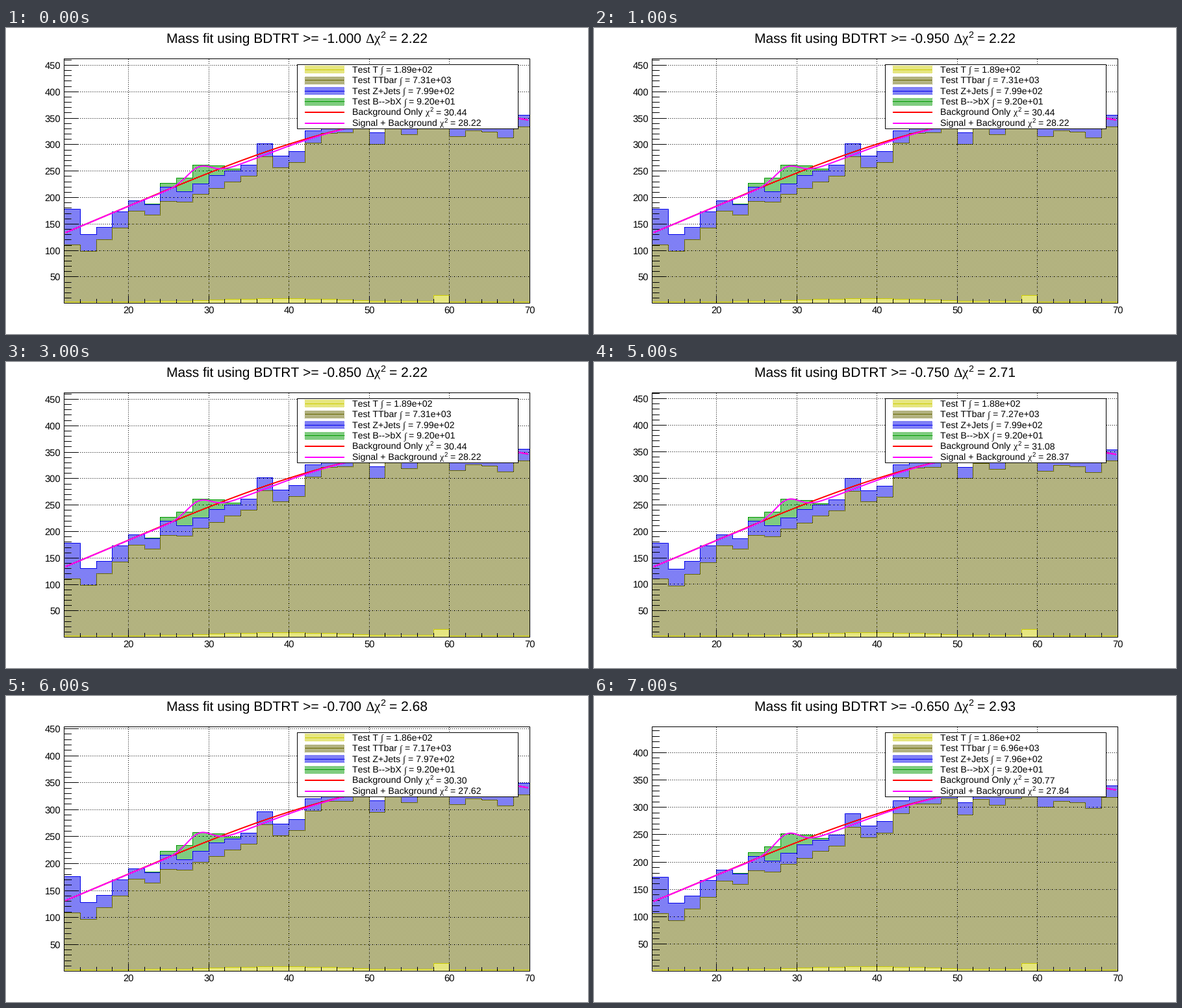
Animation, 896 px wide and 472 px high, one loop 8000 ms. Source, as a matplotlib script:

```python
import numpy as np
import matplotlib.pyplot as plt
from matplotlib.animation import FuncAnimation
from matplotlib.patches import Rectangle

W, H, DPI = 896, 472, 64
PX = 72 / DPI                      # points per pixel
LEFT, RIGHT, TOP, BASE = 89.6, 806.4, 47.2, 424.8
XMIN, XMAX, NBINS = 12, 70, 29
SANS, SERIF = "Liberation Sans", "Liberation Serif"
RED, MAGENTA = "#ff0000", "#ff00ff"

plt.rcParams.update({"text.kerning_factor": 6, "text.hinting": "none",
                     "path.snap": False})

# Yields and fit quality for each distinct selection; the heights follow them
SAMPLES = [  # name, x of the integral sign, colour, yields
    ("Test T", 576.9, (204, 204, 0), (189, 188, 186, 186)),
    ("Test TTbar", 605.9, (102, 102, 0), (7310, 7270, 7170, 6960)),
    ("Test Z+Jets", 611, (0, 0, 235), (799, 799, 797, 796)),
    ("Test B-->bX", 612.5, (0, 153, 0), (92, 92, 92, 92)),
]
FITS = [  # name, x of the chi, colour, chi squared
    ("Background Only", 645.1, RED, (30.44, 31.08, 30.30, 30.77)),
    ("Signal + Background", 667.4, MAGENTA, (28.22, 28.37, 27.62, 27.84)),
]
Y_MAX = (462.6, 461.4, 454, 447.8)
YIELDS = np.array([s[3] for s in SAMPLES])

# Bin contents for the loosest selection
b = np.arange(NBINS)
centre = XMIN + 2 * b + 1
t_bins = 3 + 6 * np.exp(-((b - 13) / 5) ** 2) + 12 * np.exp(-4 * (b - 23) ** 2)
tt_tops = np.array([111, 98, 120, 142, 174, 167, 193, 191, 206, 217, 230, 240,
                    277, 257, 266, 303, 321, 322, 331, 301, 330, 319, 331, 335,
                    315, 326, 324, 313, 334])
z_bins = (22 + 10 * np.exp(-b / 8) * np.cos(2 * np.pi * b / 3)
          + 35 * np.exp(-b / 1.1))
signal_bins = 36 * np.exp(-((centre - 28.6) / 2) ** 2 / 2)
BINS = np.array([t_bins, tt_tops - t_bins, z_bins, signal_bins])

# Fit curves
fx = np.linspace(12.15, 69.8, 240)
background = np.polyval(np.polyfit([12, 20, 30, 40, 47.2, 70],
                                   [133, 183, 247, 301, 331, 346], 3), fx)
dip = 6 * np.exp(-((fx - 34) / 8) ** 2)
bump = np.exp(-((fx - 28.8) / 1.5) ** 2 / 2)

rows, cols = np.mgrid[:H, :W]
checker = (cols + rows) % 2 == 0
edges = np.linspace(LEFT, RIGHT, NBINS + 1)
col_bin = np.clip(np.searchsorted(edges, np.arange(W) + .5) - 1, 0, NBINS - 1)
in_frame = (cols >= 90) & (cols < 806) & (rows < 425)

fig = plt.figure(figsize=(W / DPI, H / DPI), dpi=DPI, facecolor="white")
ax = fig.add_axes([0, 0, 1, 1])


def x_px(v):
    return LEFT + (v - XMIN) * (RIGHT - LEFT) / (XMAX - XMIN)


def snap(v):
    return np.floor(v) + .5


def unit(rgb):
    return tuple(c / 255 for c in rgb)


def text(x, y, s, size, font=SANS, ha="left"):
    ax.text(x, y, s, fontsize=size * PX, family=font, ha=ha, va="baseline",
            zorder=7)


def line(x, y, color="black", width=1, **kw):
    ax.plot(x, y, color=color, lw=width * PX, solid_capstyle="butt",
            dash_capstyle="butt", **kw)


def chi_squared(x, y, size):
    text(x, y, "χ", size, SERIF)
    text(x + .53 * size, y - .38 * size, "2", .68 * size)


def image(img, x, y, zorder):
    h, w = img.shape[:2]
    ax.imshow(img, extent=(x, x + w, y + h, y), interpolation="nearest",
              aspect="auto", zorder=zorder)


def draw_stack(stage, scale):
    growth = YIELDS[:, stage] / YIELDS[:, 0]
    tops = np.cumsum(BINS * growth[:, None], axis=0)
    img = np.full((H, W, 3), 255, np.uint8)
    for top, sample in reversed(list(zip(tops, SAMPLES))):
        y = BASE - scale * top
        inside = in_frame & (rows + .5 >= y[col_bin])
        img[inside] = 255
        img[inside & checker] = sample[2]
        line(snap(np.repeat(edges, 2)[1:-1]), snap(np.repeat(y, 2)),
             unit(sample[2]))
    image(img, 0, 0, 0)


def draw_axes(scale):
    dotted = dict(linestyle=(0, (1, 2)))
    for v in range(0, int((BASE - TOP) / scale) + 1, 10):
        y, major = snap(BASE - scale * v), v % 50 == 0
        line([90, 111 if major else 101], [y, y])
        if major and v:
            line([90, 806], [y, y], **dotted)
            text(84.2, y + 5, str(v), 14.8, ha="right")
    for v in range(XMIN, XMAX + 1, 2):
        x, major = snap(x_px(v)), v % 10 == 0
        line([x, x], [424, 413 if major else 418])
        if major:
            line([x, x], [48, 424], **dotted)
            text(x, 440, str(v), 14.8, ha="center")
    ax.add_patch(Rectangle((89.5, 47.5), 717, 377, fill=False, lw=PX, zorder=3))


def draw_fits(stage, scale):
    total = YIELDS.sum(axis=0)
    k = total[stage] / total[0]
    delta = FITS[0][3][stage] - FITS[1][3][stage]
    with_signal = k * (background - dip) + 15.5 * np.sqrt(delta) * bump
    line(x_px(fx), BASE - scale * k * background, RED, 2)
    line(x_px(fx), BASE - scale * with_signal, MAGENTA, 2)


def draw_legend(stage):
    ax.add_patch(Rectangle((448.5, 56.5), 340, 99, fc="white", ec="black",
                           lw=PX, zorder=4))
    size = 14.1
    for i, (name, x, color, values) in enumerate(SAMPLES + FITS):
        y = 64.3 + 16.5 * i
        base = y + 4.2
        text(533, base, name, size)
        if i < len(SAMPLES):
            top = int(y - 5.5)
            swatch = np.full((12, 61, 3), 255, np.uint8)
            swatch[checker[top:top + 12, 460:521]] = color
            image(swatch, 460, top, 5)
            line([460, 521], [snap(y)] * 2, unit(color), zorder=6)
            text(x, base, "∫", size, SERIF)
            text(x + .552 * size, base, f"= {values[stage]:.2e}", size)
        else:
            line([460, 521], [round(y)] * 2, color, 2, zorder=6)
            chi_squared(x, base, size)
            text(x + 1.187 * size, base, f"= {values[stage]:.2f}", size)


def draw_title(step, stage):
    delta = FITS[0][3][stage] - FITS[1][3][stage]
    x, y = 247, 22.8
    text(x, y, f"Mass fit using BDTRT >= {-1 + .05 * step:.3f}", 21)
    text(x + 305.8, y, "Δ", 21, SERIF)
    chi_squared(x + 318.6, y, 21)
    text(x + 343, y, f"= {delta:.2f}", 21)


def update(step):
    stage = max(0, step - 4)       # the first five cuts select the same events
    scale = (BASE - TOP) / Y_MAX[stage]
    ax.clear()
    draw_stack(stage, scale)
    draw_axes(scale)
    draw_fits(stage, scale)
    draw_legend(stage)
    draw_title(step, stage)
    ax.set_xlim(0, W)
    ax.set_ylim(H, 0)
    ax.axis("off")
    return []


anim = FuncAnimation(fig, update, frames=8, interval=1000, repeat=True,
                     repeat_delay=0, init_func=lambda: [])
plt.show()
```
